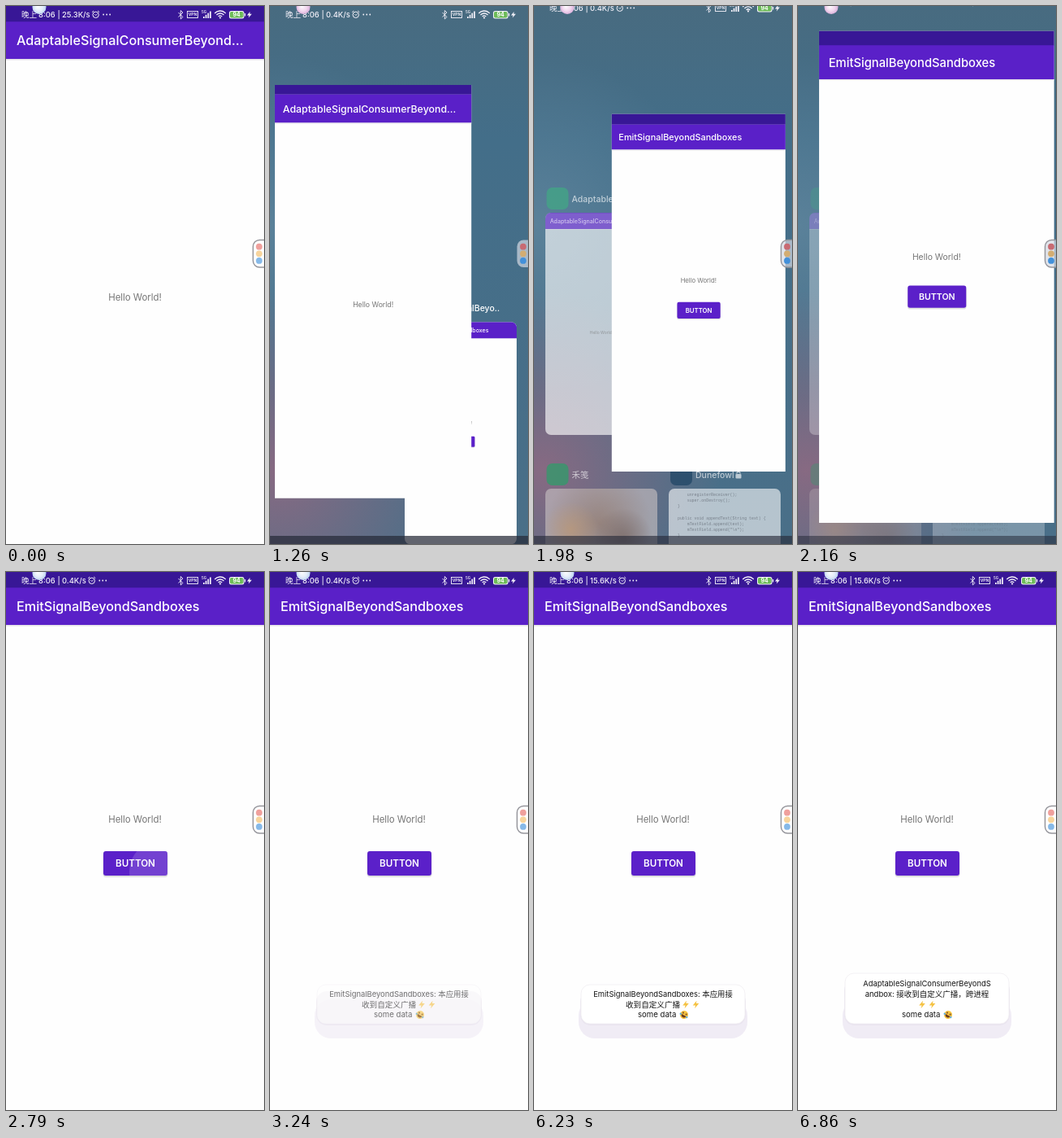
Recreate the animation shown at these times as an HTML page with a canvas. Size 318 px wide and 661 px high, loop 8000 ms.

```html
<!DOCTYPE html>
<html lang="zh-CN">
<head>
<meta charset="utf-8">
<title>Signal demo</title>
<style>
html, body { margin: 0; width: 100%; height: 100%; overflow: hidden; background: #fefefe; }
canvas { display: block; width: 318px; height: 661px; }
</style>
</head>
<body>
<canvas id="stage"></canvas>
<script>
const W = 318, H = 661, LOOP = 8000, SMALL = 0.434;
const canvas = document.getElementById('stage');
const dpr = window.devicePixelRatio || 1;
canvas.width = W * dpr;
canvas.height = H * dpr;
const c = canvas.getContext('2d');
const SANS = 'Inter, "Noto Sans CJK SC", "Noto Sans CJK", sans-serif';
const MONO = '"Liberation Mono", monospace';
const LISTENER = 'AdaptableSignalConsumerBeyond';
const SENDER = 'EmitSignalBeyondSandboxes';

const clamp = v => Math.max(0, Math.min(1, v));
const mix = (a, b, p) => a + (b - a) * p;

function track(t, points) {
  if (t <= points[0][0]) return points[0][1];
  for (let i = 1; i < points.length; i++) {
    const [a, va] = points[i - 1], [b, vb] = points[i];
    if (t <= b) return mix(va, vb, (t - a) / (b - a));
  }
  return points[points.length - 1][1];
}

// y is the middle of the line
function text(s, x, y, size, color, weight = 400, align = 'left', family = SANS) {
  c.font = `${weight} ${size}px ${family}`;
  c.textAlign = align;
  c.fillStyle = color;
  c.fillText(s, x, y + size * 0.36);
}

function rect(x, y, w, h, color, r = 0) {
  c.fillStyle = color;
  c.beginPath();
  c.roundRect(x, y, w, h, r);
  c.fill();
}

function dot(x, y, r, color) {
  c.fillStyle = color;
  c.beginPath();
  c.arc(x, y, r, 0, 7);
  c.fill();
}

function line(points, color, width = 1) {
  c.strokeStyle = color;
  c.lineWidth = width;
  c.beginPath();
  points.forEach(([x, y]) => c.lineTo(x, y));
  c.stroke();
}

function clipped(x, y, w, h, r, draw) {
  c.save();
  c.beginPath();
  c.roundRect(x, y, w, h, r);
  c.clip();
  draw();
  c.restore();
}

function faded(alpha, draw) {
  c.save();
  c.globalAlpha *= clamp(alpha);
  draw();
  c.restore();
}

function bolt(x, y, s, color) {
  c.fillStyle = color;
  c.beginPath();
  [[1, -5], [-4, 1], [-0.5, 1], [-1.5, 5], [4, -1.5], [0.5, -1.5]]
    .forEach(([dx, dy]) => c.lineTo(x + dx * s, y + dy * s));
  c.fill();
}

function laugh(x, y) {
  c.save();
  c.translate(x, y);
  c.rotate(0.5);
  dot(0, 0, 5, '#f7c440');
  c.fillStyle = '#6b3c20';
  c.beginPath();
  c.arc(0, 0.5, 3, 0, Math.PI);
  c.fill();
  line([[-3, -2.6], [-1.2, -1.6], [-3, -0.8]], '#6b3c20', 0.8);
  line([[3, -2.6], [1.2, -1.6], [3, -0.8]], '#6b3c20', 0.8);
  dot(-4.3, 1, 1.2, '#58aee8');
  dot(4.3, 1, 1.2, '#58aee8');
  c.restore();
}

function button(rippleTime) {
  faded(0.12, () => rect(119.5, 345, 80, 30, '#000', 4));
  rect(120, 343, 79, 30, '#5b20c9', 3);
  if (rippleTime >= 0 && rippleTime < 360)
    clipped(120, 343, 79, 30, 3, () =>
      dot(190, 368, 38 + rippleTime * 0.25, `rgba(255,255,255,${0.15 * (1 - rippleTime / 360)})`));
  text('BUTTON', 159.5, 358, 11.6, '#fff', 600, 'center');
}

function app(isSender, rippleTime = -1) {
  rect(0, 0, W, H + 30, '#fefefe');
  rect(0, 65, W, 1.5, '#e4e2e8');
  rect(0, 19, W, 46, '#5a20c8');
  rect(0, 0, W, 19.3, '#381796');
  text(isSender ? SENDER : LISTENER + '…', 13, 42.5, 16.2, '#fff', 500);
  text('Hello World!', 159, isSender ? 304 : 358, 11.4, '#757575', 400, 'center');
  if (isSender) button(rippleTime);
}

// App scaled by s with its top left corner at x, y, cut to top..bottom
function appWindow(isSender, x, y, s, top, bottom, r = 0) {
  clipped(x, top, W * s, bottom - top, r, () => {
    c.translate(x, y);
    c.scale(s, s);
    app(isSender);
  });
}

const appCard = (isSender, x, y) =>
  appWindow(isSender, x, y - 19 * SMALL, SMALL, y, y + 273, 7);

function label(name, x, y, color) {
  rect(x, y - 14, 27, 27, color, 7);
  text(name, x + 31, y, 10.5, '#fff', 500);
}

function wallpaper() {
  let g = c.createLinearGradient(0, 0, 0, H);
  g.addColorStop(0, '#486b80');
  g.addColorStop(0.25, '#436e89');
  g.addColorStop(1, '#4a6f88');
  c.fillStyle = g;
  c.fillRect(0, 0, W, H);
  for (const [x, y, r, rgb, a] of [[0, 270, 210, '112,148,170', 0.5], [10, 570, 220, '156,104,128', 0.75]]) {
    g = c.createRadialGradient(x, y, 0, x, y, r);
    g.addColorStop(0, `rgba(${rgb},${a})`);
    g.addColorStop(1, `rgba(${rgb},0)`);
    c.fillStyle = g;
    c.fillRect(0, 0, W, H);
  }
}

function chatCard(y) {
  clipped(14, y, 138, 273, 7, () => {
    rect(14, y, 138, 273, '#c5bfc0');
    for (const [x, dy, r, rgb] of [[80, 42, 65, '139,111,94'], [45, 50, 34, '196,154,112'], [110, 60, 36, '110,92,88']]) {
      const g = c.createRadialGradient(x, y + dy, 0, x, y + dy, r);
      g.addColorStop(0, `rgba(${rgb},.9)`);
      g.addColorStop(1, `rgba(${rgb},0)`);
      c.fillStyle = g;
      c.fillRect(14, y, 138, 100);
    }
  });
}

function codeCard(y) {
  rect(166, y, 138, 273, '#f3f4f6', 7);
  ['    unregisterReceiver();', '    super.onDestroy();', '}', '',
    'public void appendText(String text) {', '    mTextField.append(text);',
    '    mTextField.append("\\n");', '}']
    .forEach((s, i) => text(s, 177, y + 7 + i * 7.2, 4.9, '#555b66', 400, 'left', MONO));
}

function lock(x, y) {
  rect(x - 3.5, y - 1, 7, 5.5, '#fff', 1);
  c.strokeStyle = '#fff';
  c.lineWidth = 1.2;
  c.beginPath();
  c.arc(x, y - 1.5, 2.2, Math.PI, 0);
  c.stroke();
}

function recents(shift, leftShown, rightShown, labelAlpha) {
  const top = 254 + shift, next = top + 339;
  if (leftShown) {
    appCard(false, 14, top);
    faded(labelAlpha, () => label('AdaptableSigna‥', 15.5, top - 17, '#3fae82'));
  }
  if (rightShown) {
    appCard(true, 166, top);
    label('EmitSignalBeyo‥', 168, top - 17, '#3fae82');
  }
  label('禾笺', 15.5, next - 17, '#22a565');
  label('Dunefowl', 168, next - 17, '#17405f');
  lock(252, next - 17);
  chatCard(next);
  codeCard(next);
}

function statusBar(speed, pink) {
  const white = '#f4f2fa', y = 10.5;
  text('晚上', 19, y, 9.6, white, 500);
  text('8:06', 40, y, 9.4, white, 500);
  text('|', 63.5, y, 9.4, white, 500);
  text(speed, 69, y, 9.4, white, 500);
  const x = 69 + c.measureText(speed).width + 7;
  c.strokeStyle = white;
  c.lineWidth = 1;
  c.beginPath();
  c.arc(x, y + 0.3, 3.7, 0, 7);
  c.stroke();
  line([[x - 1.5, y - 0.5], [x, y + 1], [x + 2, y - 0.8]], white, 0.9);
  line([[x - 4.5, y - 2.8], [x - 2.5, y - 4.6]], white);
  line([[x + 4.5, y - 2.8], [x + 2.5, y - 4.6]], white);
  for (let i = 0; i < 3; i++) dot(x + 9.5 + i * 4, y, 0.9, white);

  line([[212.5, 8], [218, 13.5], [215.3, 16], [215.3, 5.5], [218, 8], [212.5, 13.5]], white, 0.9);
  c.strokeRect(223.5, 6.5, 13, 8);
  text('VPN', 230, y + 0.1, 5, white, 600, 'center');
  text('5G', 241, 7.5, 4.5, white, 600);
  for (let i = 0; i < 4; i++) rect(243 + i * 2.7, 13 - i * 2.2, 1.7, 2 + i * 2.2, white);
  c.lineWidth = 1.3;
  for (const r of [3, 6, 9]) {
    c.beginPath();
    c.arc(264, 15, r, -Math.PI * 0.77, -Math.PI * 0.23);
    c.stroke();
  }
  dot(264, 14.5, 1.1, white);
  rect(275, 6, 18.5, 9.5, white, 2.5);
  rect(276, 7, 16.5, 7.5, '#6dbb58', 1.7);
  rect(294, 9, 1.2, 3.5, white);
  text('94', 284.2, y + 0.2, 7, '#fff', 700, 'center');
  bolt(300, y + 0.3, 0.75, white);

  const g = c.createRadialGradient(39, 0, 0, 41, 2, 9);
  g.addColorStop(0, '#fff');
  g.addColorStop(0.6, pink ? '#f1d5ee' : '#e2ecfa');
  g.addColorStop(1, pink ? '#d5a8d6' : '#b3cdee');
  return g;
}

function sideHandle(inRecents, outlined) {
  const colors = inRecents ? ['#c86a72', '#d3ad72', '#4290da'] : ['#f0a09c', '#f8d49c', '#86b9e8'];
  rect(304.5, 287.5, 22, 33.5, inRecents ? 'rgba(212,216,226,.7)' : '#fefefe', 8);
  if (outlined) {
    c.strokeStyle = '#96969c';
    c.lineWidth = 1.5;
    c.stroke();
  }
  colors.forEach((color, i) => dot(312, 295.7 + i * 8.6, 3.9, color));
}

function toast(fromListener) {
  const top = fromListener ? 493 : 507, ink = '#151515';
  rect(55, 525, 208, 48, '#f0ecf5', 20);
  rect(57, top + 8, 204, 549 - top, '#e9e4ef', 13);
  rect(58, top, 202, 555 - top, '#fff', 11);
  c.strokeStyle = '#f0eef2';
  c.lineWidth = 0.8;
  c.stroke();
  if (fromListener) {
    text(LISTENER + 'S', 159, 506, 9.4, ink, 400, 'center');
    text('andbox: 接收到自定义广播，跨进程', 159, 518.5, 9.5, ink, 400, 'center');
  } else {
    text(SENDER + ': 本应用接', 159, 519, 9.4, ink, 400, 'center');
    text('收到自定义广播', 113, 531.5, 9.6, ink);
  }
  const x = fromListener ? 153 : 187;
  bolt(x, 531.5, 0.95, '#f5c242');
  bolt(x + 12.5, 531.5, 0.95, '#f5c242');
  text('some data', 128, 544, 9.6, ink);
  laugh(185, 544);
}

function draw(t) {
  c.setTransform(dpr, 0, 0, dpr, 0, 0);
  const inRecents = t >= 810 && t < 2340;
  const opening = t < 1800 ? 0 : (1 - Math.cos(Math.PI * clamp((t - 1700) / 620))) / 2;

  if (inRecents) {
    wallpaper();
    const p = track(t, [[720, 0], [1260, 0.419], [1350, 0.72], [1440, 0.92], [1530, 1]]);
    const settled = t >= 1530;
    faded(1 - 0.85 * opening, () =>
      recents(231 * (1 - p), settled, !opening, t < 1620 ? 0.5 : 1));
    if (!settled) {
      const y = 246 * p ** 1.11;
      appWindow(false, 14 * p, y, mix(1, SMALL, p), y + 8.2 * p, mix(H, 527, p));
    }
    faded(1 - 0.3 * opening, () => rect(0, 651, W, 10, 'rgba(38,42,56,.72)'));
    if (opening) {
      const y = 246 * (1 - opening) ** 1.12;
      appWindow(true, 166 * (1 - opening), y, mix(SMALL, 1, opening),
        y + 8 * Math.max(0, 1 - 3 * opening), mix(527, H, opening ** 1.27));
    }
  } else {
    app(t >= 2340, t - 2790);
  }

  c.save();
  if (inRecents) c.translate(0, -19 * opening);
  const ball = statusBar(t < 360 ? '25.3K/s' : t < 4250 ? '0.4K/s' : '15.6K/s', inRecents);
  c.restore();
  dot(41, 1.5, 8.5, ball);
  sideHandle(inRecents, !inRecents || opening > 0);

  const first = t < 6230 ? (t - 2970) / 450 : 1 - (t - 6230) / 270;
  const second = (t - 6500) / 360;
  if (first > 0) faded(first, () => toast(false));
  if (second > 0) faded(second, () => toast(true));
}

function step(t) {
  const base = t < 3440 ? 0 : 3440;
  return base + Math.floor((t - base) / 90) * 90;
}

const start = performance.now();
function tick() {
  draw(step((performance.now() - start) % LOOP));
  requestAnimationFrame(tick);
}
tick();
</script>
</body>
</html>
```
